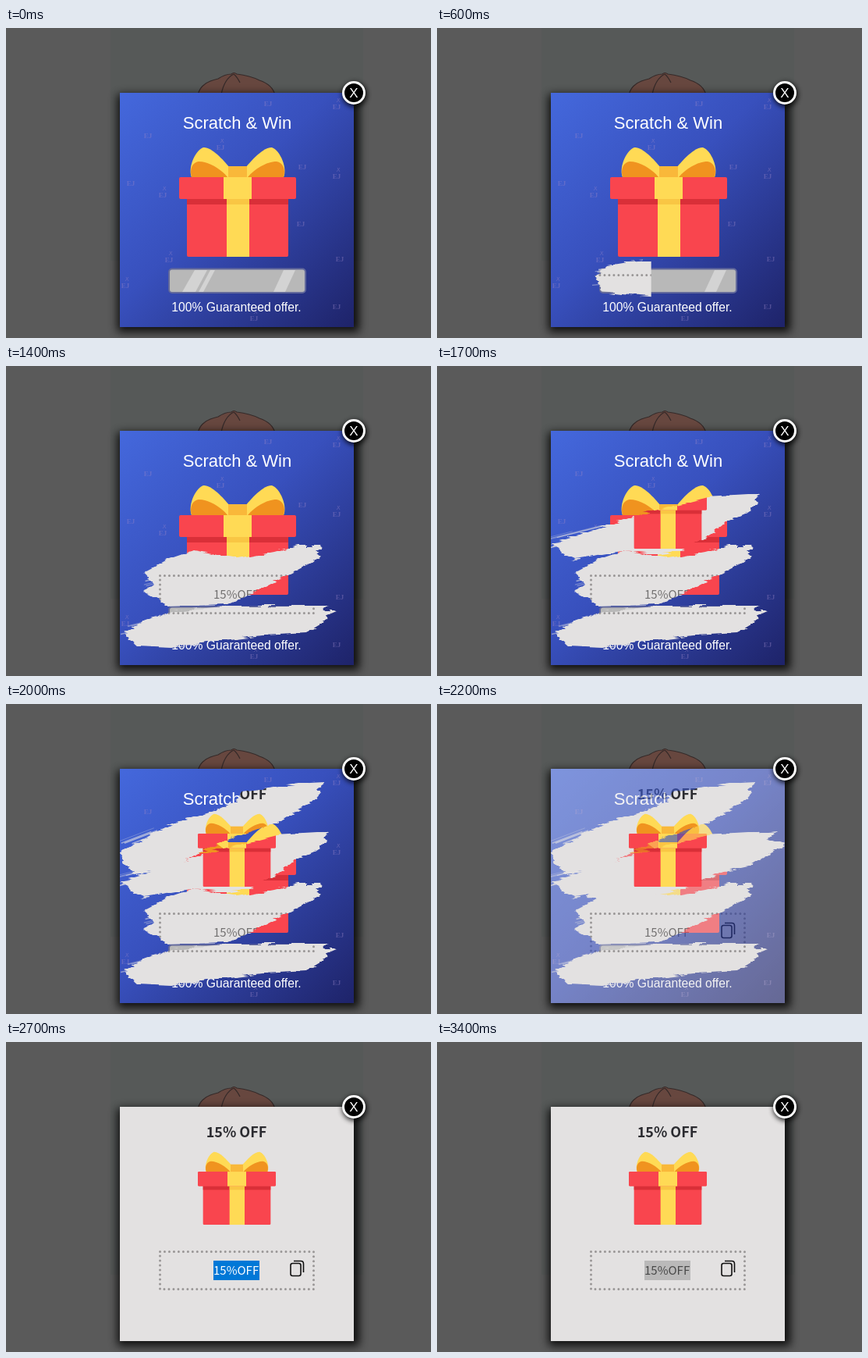
An HTML page that plays this animation: 545 by 397 pixels, repeating every 3600 ms.

```html
<!DOCTYPE html>
<html lang="en">
<head>
<meta charset="utf-8">
<title>Scratch card</title>
<style>
  html, body { margin: 0; width: 100%; height: 100%; overflow: hidden; background: #5a5a5a; }
  svg { display: block; width: 100%; height: 100%; }
  .arial { font-family: "Liberation Sans", Arial, sans-serif; fill: #fff; }
  .coupon { font-family: "Noto Sans CJK SC", "Noto Sans CJK JP", "Noto Sans", sans-serif; }
  .tiny { font: 700 9px "Liberation Serif", serif; fill: #9a86c8; opacity: .4; }
</style>
</head>
<body>
<svg viewBox="0 0 545 397">
  <defs>
    <linearGradient id="blue" x1="0" y1="0" x2="1" y2="1">
      <stop offset="0" stop-color="#4468dc"/>
      <stop offset=".45" stop-color="#3850bd"/>
      <stop offset="1" stop-color="#1e2369"/>
    </linearGradient>
    <filter id="shadow" x="-20%" y="-20%" width="140%" height="140%">
      <feGaussianBlur stdDeviation="6"/>
    </filter>
    <filter id="soft" x="-50%" y="-50%" width="200%" height="200%">
      <feGaussianBlur stdDeviation="3"/>
    </filter>
    <filter id="rough" x="-5%" y="-10%" width="110%" height="120%">
      <feTurbulence type="fractalNoise" baseFrequency=".03 .25" numOctaves="2" seed="4"/>
      <feDisplacementMap in="SourceGraphic" scale="9" xChannelSelector="R" yChannelSelector="G"/>
    </filter>
    <mask id="scratched" maskUnits="userSpaceOnUse" x="146" y="83" width="300" height="300">
      <rect x="146" y="83" width="300" height="300" fill="#fff"/>
      <g id="strokes"></g>
    </mask>
    <g id="gift">
      <g id="bow">
        <path d="M16 38C11 27 20 4 31 0C41 -1 56 15 65 26V38Z" fill="#ffda55"/>
        <path d="M16 38C13 28 17 19 25 18C38 18 54 28 62 38Z" fill="#f0931f"/>
      </g>
      <use href="#bow" transform="matrix(-1 0 0 1 150 0)"/>
      <rect x="63" y="24" width="24" height="15" fill="#f9b83a"/>
      <rect x="10" y="62" width="130" height="78" rx="2" fill="#f9454e"/>
      <rect x="10" y="64" width="130" height="9" fill="#d92f38"/>
      <rect x="61" y="64" width="29" height="76" fill="#ffda55"/>
      <rect x="61" y="66" width="29" height="7" fill="#f9c644"/>
      <rect y="38" width="150" height="28" rx="2" fill="#f9454e"/>
      <rect x="57" y="38" width="36" height="28" fill="#ffda55"/>
    </g>
  </defs>

  <rect width="545" height="397" fill="#5a5a5a"/>
  <rect x="134" width="324" height="298" fill="#565958"/>
  <g fill="#67473f" stroke="#352a29" stroke-width="1.2">
    <path d="M246 86C248 74 258 68 272 65C278 61 284 59 289 59Q292 56 296 59C305 60 317 63 325 67C337 71 343 77 345 86Z"/>
    <path d="M292 59C282 64 278 75 276 85M292 59C296 62 298 66 300 70" fill="none"/>
  </g>
  <rect x="143" y="85" width="310" height="304" fill="#000" opacity=".85" filter="url(#shadow)"/>

  <g id="prize">
    <rect x="146" y="83" width="300" height="300" fill="#e3e1e1"/>
    <text class="coupon" x="295.5" y="122" font-size="18" font-weight="700" text-anchor="middle" fill="#2b2b30">15% OFF</text>
    <use href="#gift" transform="translate(246 140.7) scale(.6667)"/>
    <rect x="197.5" y="268.5" width="197" height="48" fill="none" stroke="#999696" stroke-width="3" stroke-linecap="round" stroke-dasharray="0 5.98"/>
    <rect id="selection" x="266" y="280" width="59" height="25"/>
    <text id="code" class="coupon" x="266" y="298" font-size="15">15%OFF</text>
    <g fill="none" stroke="#111" stroke-width="1.6">
      <rect x="365" y="283.5" width="13" height="16" rx="2.5"/>
      <path d="M369 280.5H378Q381.5 280.5 381.5 284V295"/>
    </g>
  </g>

  <g id="cover" mask="url(#scratched)">
    <rect x="146" y="83" width="300" height="300" fill="url(#blue)"/>
    <g id="pattern"></g>
    <text class="arial" x="296.5" y="129" font-size="22" text-anchor="middle">Scratch &amp; Win</text>
    <use href="#gift" transform="translate(222 153)"/>
    <rect x="209" y="308.5" width="175" height="30.5" rx="4" fill="#b8b8b8" stroke="#62699b" stroke-width="2"/>
    <path d="M242 310H258L243 338H226ZM262 310H268L253 338H247ZM356 310H371L358 338H343Z" fill="#d3d3d3"/>
    <text class="arial" x="295.5" y="363" font-size="15.7" text-anchor="middle">100% Guaranteed offer.</text>
  </g>

  <circle cx="447" cy="85" r="16" opacity=".8" filter="url(#soft)"/>
  <circle cx="446" cy="83" r="13.5" fill="#000" stroke="#fff" stroke-width="3"/>
  <text class="arial" x="446" y="89" font-size="17" text-anchor="middle">X</text>
</svg>
<script>
const LOOP = 3600, STEP = 100;
const byId = id => document.getElementById(id);

function add(parent, tag, attrs, text) {
  const el = document.createElementNS("http://www.w3.org/2000/svg", tag);
  for (const key in attrs) el.setAttribute(key, attrs[key]);
  if (text) el.textContent = text;
  parent.appendChild(el);
  return el;
}

let seed = 7;
const random = () => (seed = (seed * 16807) % 2147483647) / 2147483647;

// Each stroke is wiped open between from and to; tail is the dry-brush end.
const strokes = [
  { from: 400, to: 1000, until: 1200, left: 198, right: 428, tail: [205, 298, 34, -.08],
    d: "M204 318L220 304L245 300L288 297L318 300L332 306L414 307L407 313L424 313L408 320L411 326L396 335L394 341L340 347L318 354L312 347L245 342L212 338Z" },
  { from: 1000, to: 1200, back: true, left: 146, right: 428, tail: [153, 330, 22, -.25],
    d: "M152 342L175 328L215 314L290 307L414 307L407 313L424 313L408 320L411 326L396 335L385 342L330 345L270 352L212 361L168 359L158 350Z" },
  { from: 1200, to: 1400, left: 172, right: 412, tail: [180, 254, 38, -.25],
    d: "M178 263L205 249L240 237L297 247L345 238L375 230L407 230L398 238L404 243L392 252L362 267L318 290L285 305L205 307L195 297L178 288L189 280Z" },
  { from: 1400, to: 1600, back: true, left: 146, right: 420, tail: [150, 216, 22, -.25],
    d: "M147 226L200 211L253 192L300 180L348 168L400 165L416 162L408 170L411 175L400 187L372 199L345 220L312 237L280 241L237 237L176 247L160 240Z" },
  { from: 1700, to: 2000, left: 146, right: 414, tail: [150, 176, 28, -.38],
    d: "M147 190L190 164L230 148L270 135L297 123L302 112L345 106L372 102L410 100L400 108L404 114L392 127L370 138L352 150L310 165L285 174L250 189L210 212L165 218L152 204Z" },
  { from: 2000, to: 2200, left: 185, right: 446, tail: [200, 214, 20, -.2],
    d: "M190 248L230 205L300 179L350 168L405 166L437 163L424 173L445 180L420 195L400 207L372 213L312 238L240 252Z" }
];

strokes.forEach((stroke, i) => {
  const clip = add(byId("strokes"), "clipPath", { id: "wipe" + i });
  stroke.wipe = add(clip, "rect", { y: 83, height: 300 });
  stroke.group = add(byId("strokes"), "g", { "clip-path": `url(#wipe${i})` });
  add(stroke.group, "path", { d: stroke.d, filter: "url(#rough)" });
  const [x, y, height, slope] = stroke.tail;
  for (let n = 0; n < 12; n++) {
    const x0 = x + random() * 22 - 6, y0 = y + random() * height, length = 25 + random() * 50;
    add(stroke.group, "path", {
      d: `M${x0} ${y0}l${length} ${length * slope}`,
      stroke: "#000", "stroke-width": .6 + random() * 1.4, opacity: .3 + random() * .4
    });
  }
});

const marks = [[336, 97], [424, 101], [182, 138], [275, 153], [380, 178], [424, 190], [160, 199],
  [201, 214], [378, 251], [209, 297], [428, 296], [153, 330], [424, 357], [318, 372]];
marks.forEach(([x, y], i) => {
  add(byId("pattern"), "text", { class: "tiny", x, y: y + 3, "text-anchor": "middle" }, "EJ");
  if (i % 2) add(byId("pattern"), "path", {
    d: `M${x} ${y - 6}l4 -5m-3 0l3 5`, stroke: "#9a86c8", opacity: .35
  });
});

const clamp = v => Math.max(0, Math.min(1, v));

function render(time) {
  const t = Math.floor((time % LOOP) / STEP) * STEP;
  for (const { from, to, until = LOOP, back, left, right, wipe, group } of strokes) {
    const width = (right - left) * clamp((t - from) / (to - from));
    wipe.setAttribute("x", back ? right - width : left);
    wipe.setAttribute("width", width);
    group.setAttribute("visibility", width && t < until ? "visible" : "hidden");
  }
  const fade = t < 2100 ? 0 : t < 2200 ? .14 : clamp(.37 + (t - 2200) / 200 * .47);
  byId("cover").setAttribute("opacity", t >= 2500 ? 0 : 1 - fade);

  // The selection is blue while focused, grey once focus is lost.
  const selected = t >= 2700, focused = selected && t < 3400;
  byId("selection").setAttribute("fill", focused ? "#0078d7" : selected ? "#bab9b9" : "none");
  byId("code").setAttribute("fill", focused ? "#fff" : selected ? "#484848" : "#727070");
}

const start = performance.now();
function tick() {
  render(performance.now() - start);
  requestAnimationFrame(tick);
}
tick();
</script>
</body>
</html>
```
